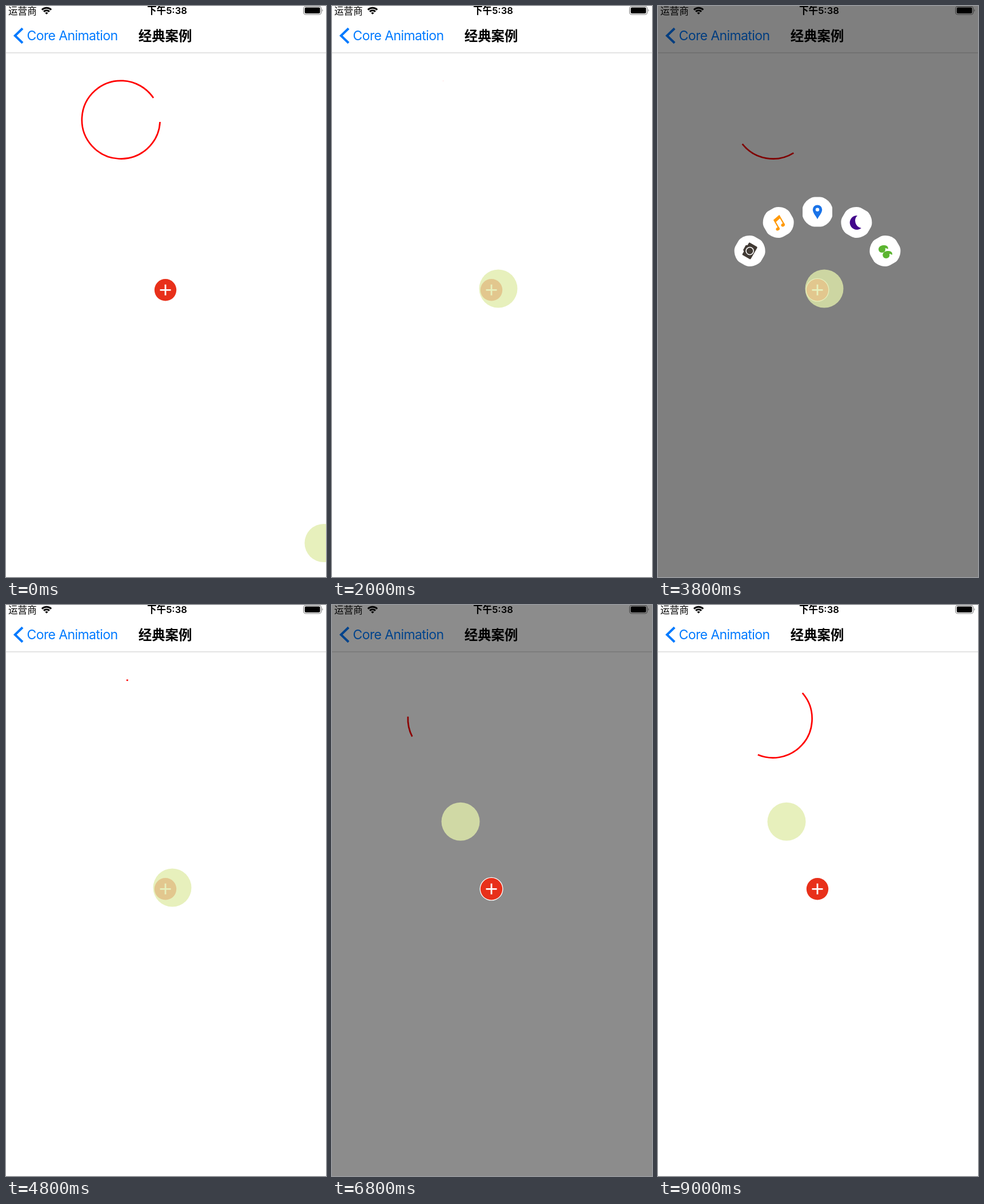
Recreate the animation shown at these times as an HTML page. Size 560 by 1000 pixels, loop 9.2 s.

```html
<!DOCTYPE html>
<html lang="zh">
<head>
<meta charset="utf-8">
<style>
  html, body { margin: 0; height: 100%; overflow: hidden; background: #fff; }
  svg { display: block; width: 560px; height: 1000px; }
  text { font-family: Inter, "Noto Sans CJK SC", "Noto Sans CJK", sans-serif; }
</style>
</head>
<body>
<svg viewBox="0 0 560 1000">
  <defs>
    <clipPath id="tile"><rect x="-26" y="-26" width="52" height="52"/></clipPath>
  </defs>

  <!-- status bar -->
  <text x="4" y="14.6" font-size="16.6">运营商</text>
  <g transform="translate(71 14.8)" fill="none" stroke="#000" stroke-width="3">
    <path d="M-8.1-8.1A11.5 11.5 0 0 1 8.1-8.1M-4.9-4.9A6.9 6.9 0 0 1 4.9-4.9"/>
    <path d="M0 0L-2.6-2.6A3.7 3.7 0 0 1 2.6-2.6Z" fill="#000" stroke="none"/>
  </g>
  <text x="247" y="14.4" font-size="16.6" font-weight="600">下午5:38</text>
  <rect x="520.7" y="0.7" width="31" height="14.2" rx="4" fill="none" stroke="#8c8c8c" stroke-width="1.3"/>
  <rect x="522.8" y="2.6" width="26.8" height="10.4" rx="2" fill="#000"/>
  <path d="M553.3 5.5Q556 7.7 553.3 10Z" fill="#8c8c8c"/>

  <!-- navigation bar -->
  <path d="M29 39.3L15.8 52L29 64.7" fill="none" stroke="#007aff" stroke-width="4"/>
  <text x="36.5" y="60" font-size="23" letter-spacing="-0.6" fill="#007aff">Core Animation</text>
  <text x="231.8" y="60.7" font-size="23.4" font-weight="600">经典案例</text>
  <rect y="81.3" width="560" height="1.4" fill="#d8d8d8"/>

  <circle id="arc" cx="201.2" cy="199.2" r="68.4" pathLength="360" fill="none" stroke="#f00" stroke-width="2.7"/>
  <rect id="dim" width="560" height="1000"/>

  <g id="items">
    <g>
      <g transform="rotate(-60)"><circle r="27" fill="#fff" clip-path="url(#tile)"/>
        <path d="M-11-8.5H-6L-4-11H5L7-8.5H11Q12.5-8.5 12.5-7V7Q12.5 8.5 11 8.5H-11Q-12.5 8.5-12.5 7V-7Q-12.5-8.5-11-8.5Z" fill="#423b35"/>
        <circle r="6.5" fill="none" stroke="#fff" stroke-width="1.6"/>
      </g>
    </g>
    <g>
      <g transform="rotate(-30)" fill="#ff9a0a"><circle r="27" fill="#fff" clip-path="url(#tile)"/>
        <path d="M-5.5-8L8-10.5V8H5.8V-4.5L-3.3-2.7V9.5H-5.5Z"/>
        <ellipse cx="-6.6" cy="9.5" rx="3.4" ry="2.8"/>
        <ellipse cx="4.7" cy="8" rx="3.4" ry="2.8"/>
      </g>
    </g>
    <g>
      <circle r="27" fill="#fff" clip-path="url(#tile)"/>
      <path d="M0 13C-2 8-8.2 2-8.2-4A8.2 8.2 0 0 1 8.2-4C8.2 2 2 8 0 13Z" fill="#1a73e8"/>
      <circle cy="-4" r="3.2" fill="#fff"/>
    </g>
    <g>
      <circle r="27" fill="#fff" clip-path="url(#tile)" transform="rotate(30)"/>
      <path d="M1.5-12A12.4 12.4 0 1 0 8.5 10A13 13 0 0 1 1.5-12Z" fill="#42058c"/>
    </g>
    <g>
      <circle r="27" fill="#fff" clip-path="url(#tile)" transform="rotate(60)"/>
      <g fill="#5cb531">
        <path id="leaf" d="M-11.5-3C-11.5-8-6-10.5-1-10C4-9.5 6-7 5-3C3-5 1-5 0-4.5C2 0-2 3-5.5 3C-9 3-11.5 0-11.5-3Z"/>
        <use href="#leaf" transform="translate(7.3 10)"/>
      </g>
    </g>
  </g>

  <g transform="translate(279 497.3)">
    <circle r="20.5" fill="#fff"/>
    <circle r="19.2" fill="#e8301a"/>
    <path d="M-9.5 0H9.5M0-9.5V9.5" stroke="#fff" stroke-width="2.8"/>
  </g>
  <circle id="touch" r="33.5" fill="#e2edac" fill-opacity="0.8"/>
</svg>
<script>
const LOOP = 9200, STEP = 200;
const $ = id => document.getElementById(id);
const items = [...$('items').children];
const clamp = x => Math.min(1, Math.max(0, x));

// Linear interpolation through rows of [x, ...values]
function sample(rows, x) {
  let i = 1;
  while (i < rows.length - 1 && x > rows[i][0]) i++;
  const a = rows[i - 1], b = rows[i], k = clamp((x - a[0]) / (b[0] - a[0]));
  return a.slice(1).map((v, j) => v + (b[j + 1] - v) * k);
}

// cubic-bezier(.4, 0, .2, 1)
function ease(x) {
  x = clamp(x);
  let lo = 0, hi = 1, s;
  for (let i = 0; i < 24; i++) {
    s = (lo + hi) / 2;
    const u = 1 - s;
    if (1.2 * u * u * s + 0.6 * u * s * s + s ** 3 < x) lo = s; else hi = s;
  }
  return s * s * (3 - 2 * s);
}

// step number -> recorded seconds
const CLOCK = [[0, .44], [9, 1.556], [14, 2.1486], [24, 3.438], [28, 3.937], [36, 4.941], [45, 6.057]];
// step number -> finger x, y
const FINGER = [[0, 556, 940.5], [7, 291, 495], [27, 291, 495], [28, 258, 434.5], [29, 225, 379.3]];
// seconds -> radius, rotation
const RADIUS = 136.7;
const BLOOM_R = [[0, 0], [.15, RADIUS + 13.5], [.21, RADIUS - 6.8], [.3, RADIUS]];
const BLOOM_A = [[0, 0], [.09, -180], [.18, -270], [.3, -360]];
const FOLD = [[0, RADIUS, 0], [.2625, RADIUS + 6.8, 270], [.35, 0, 360]];
const EVENTS = [[1.85, 'bloom'], [2.85, 'fold'], [3.6, 'bloom'], [4.33, 'pick']];
const PICKED = 1;

function spinner(sec) {
  const t = sec % 1.7;
  const start = 360 * ease((t - .5) / 1.2), end = 360 * ease(t / .7);
  $('arc').setAttribute('stroke-dasharray', `${end - start} 360`);
  $('arc').setAttribute('transform', `rotate(${t / 1.7 * 360 - 90 + start} 201.2 199.2)`);
}

function menu(sec) {
  const event = EVENTS.filter(e => e[0] <= sec).pop();
  const kind = event ? event[1] : 'none', t = event ? sec - event[0] : 0;
  const closing = kind === 'fold' || kind === 'pick';
  const dim = kind === 'bloom' ? 1 : closing ? 1 - clamp((t - .35) / .1) : 0;
  $('dim').setAttribute('opacity', dim * .5);

  items.forEach((item, i) => {
    let r = RADIUS, turn = 0, scale = 1, alpha = 1;
    if (kind === 'bloom') {
      [r] = sample(BLOOM_R, t);
      [turn] = sample(BLOOM_A, t);
    } else if (kind === 'fold') {
      [r, turn] = sample(FOLD, t);
      if (t > .35) alpha = 0;
    } else if (kind === 'pick') {
      const k = clamp(t / (i === PICKED ? .309 : .185));
      scale = i === PICKED ? 1 + 2 * k : 1 - k;
      alpha = 1 - k;
    } else alpha = 0;
    const angle = (i + 1) * Math.PI / 6;
    const x = 279 - r * Math.cos(angle), y = 497.3 - r * Math.sin(angle);
    item.setAttribute('transform', `translate(${x} ${y}) rotate(${turn}) scale(${scale})`);
    item.setAttribute('opacity', alpha);
  });
}

function draw(now) {
  const step = Math.floor(now % LOOP / STEP);
  const [sec] = sample(CLOCK, step), [x, y] = sample(FINGER, step);
  spinner(sec);
  menu(sec);
  $('touch').setAttribute('cx', x);
  $('touch').setAttribute('cy', y);
}

function tick() {
  draw(performance.now());
  requestAnimationFrame(tick);
}
tick();
</script>
</body>
</html>
```
